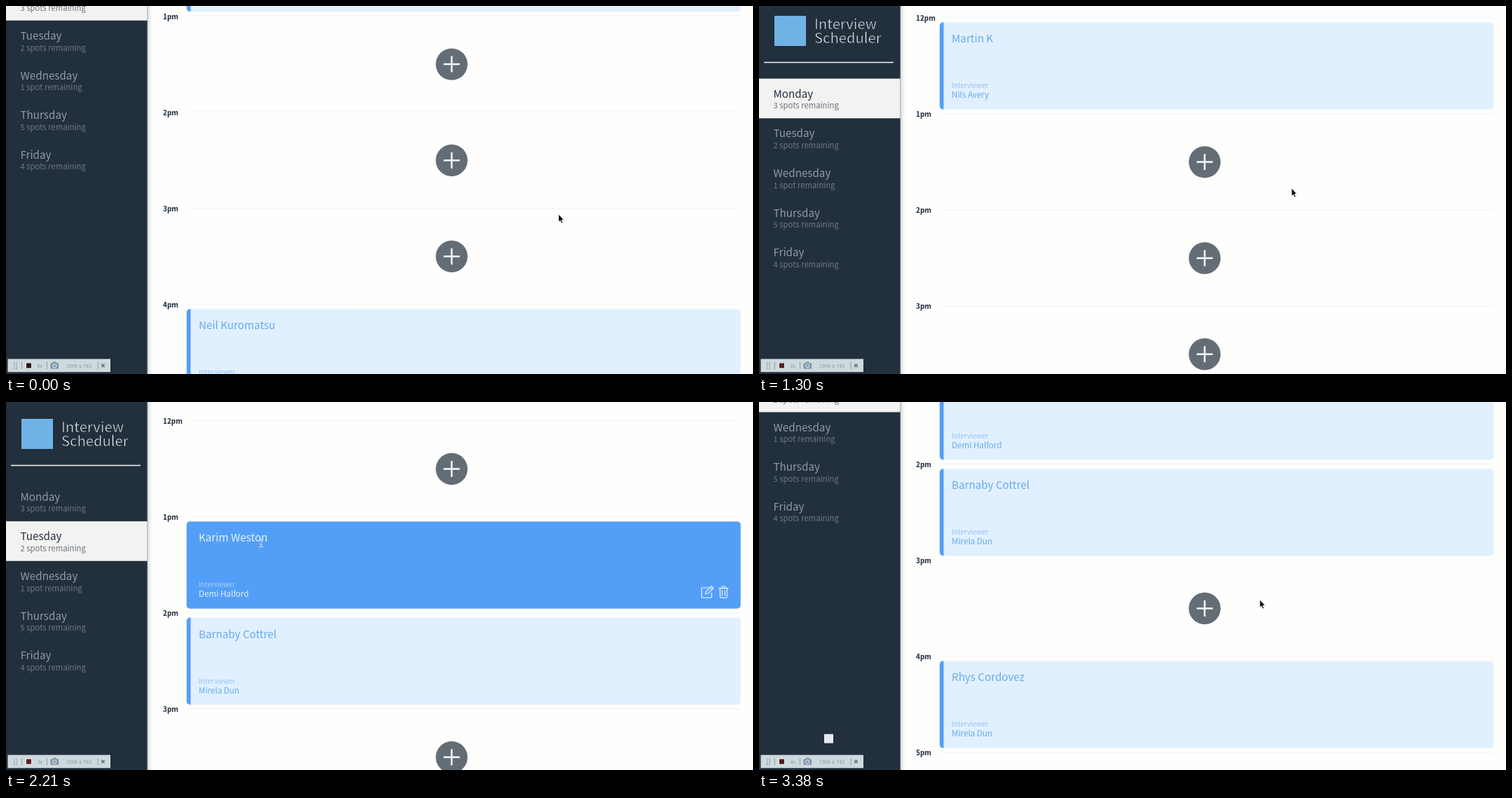
Recreate the animation shown at these times as an HTML page. Size 1066 by 525 pixels, loop 3510 ms.

```html
<!DOCTYPE html>
<html lang="en">
<head>
<meta charset="utf-8">
<title>Interview scheduler</title>
<style>
  html, body { margin: 0; width: 100%; height: 100%; overflow: hidden; background: #fefefd; }
  svg { display: block; width: 100%; height: 100%; }
  text { font-family: "Noto Sans CJK JP", "Noto Sans CJK SC", "Open Sans", sans-serif; }
  /* A background-coloured stroke thins the glyphs to a light weight. */
  .title { font-size: 20.3px; fill: #eef1f3; stroke: #222f3c; stroke-width: .6; }
  .day { font-size: 15.2px; fill: #8f9aa4; }
  .spots { font-size: 11.3px; fill: #6d7984; }
  .active .day { fill: #222f3e; }
  .active .spots { fill: #69737d; }
  .row { fill: none; }
  .active .row { fill: #f2f2f1; }
  .hour { font-size: 10px; font-weight: 700; fill: #1d2938; }
  .rule { stroke: #f2f3f4; stroke-width: 1.2; }
  .card { fill: #e1f0ff; }
  .edge { fill: #549ff6; }
  .name { font-size: 15.2px; fill: #66aaec; }
  .role { font-size: 9.8px; fill: #93c3f2; }
  .host { font-size: 11.6px; font-weight: 500; fill: #66aaec; }
  .icons { fill: none; stroke: #d8e9fc; stroke-width: 1.4; stroke-linejoin: round; stroke-linecap: round; visibility: hidden; }
  .hover .card, .hover .edge { fill: #539ff7; }
  .hover .name, .hover .host { fill: #e4f0fd; }
  .hover .role { fill: #a9cffa; }
  .hover .icons { visibility: visible; }
  .disc { fill: #636d76; }
  .disc.dark { fill: #4b5660; }
  .tool { font-family: "Noto Serif", "Liberation Serif", serif; font-size: 7.2px; fill: #8796a0; }
</style>
</head>
<body>
<svg id="stage" viewBox="0 0 1066 525" preserveAspectRatio="none" xmlns="http://www.w3.org/2000/svg">
  <defs>
    <linearGradient id="shade">
      <stop offset="0" stop-color="#7f8a98" stop-opacity=".55"/>
      <stop offset=".45" stop-color="#a5adb8" stop-opacity=".2"/>
      <stop offset="1" stop-color="#a5adb8" stop-opacity="0"/>
    </linearGradient>
  </defs>
  <rect width="1066" height="525" fill="#fefefd"/>
  <g id="boards"></g>
  <rect x="201" width="8" height="525" fill="url(#shade)"/>
  <rect width="201.6" height="525" fill="#222f3c"/>
  <g id="sidebar">
    <rect x="22" y="24" width="45" height="43" fill="#6fb2e6"/>
    <text class="title" x="79" y="42.6">Interview</text>
    <text class="title" x="79" y="63.2">Scheduler</text>
    <path d="M7 90.4H192" stroke="#f4f6f7" stroke-width="1.5"/>
    <rect x="93" y="686" width="13" height="13" fill="#e6eaec"/>
  </g>
  <g id="toolbar">
    <rect x="2.5" y="503.5" width="146.5" height="18.7" fill="#ced9dd"/>
    <path d="M11.8 508.5V518M15.2 508.5V518" stroke="#75858f" stroke-width="1.3" stroke-dasharray="1.3 1.4"/>
    <path d="M22.5 508V518M58.5 508V518M131.2 508V518" stroke="#8d9ca5" stroke-width="1"/>
    <rect x="28" y="508.5" width="9" height="9" fill="#e6edf0"/>
    <rect id="record" x="29" y="509.5" width="7" height="7"/>
    <text id="clock" class="tool" x="44.5" y="515.6"></text>
    <path d="M63.5 509.5h2.6l1.4-2h3.6l1.4 2h2.6v8H63.5z" fill="#7d96a8"/>
    <circle cx="69.3" cy="513.2" r="2.5" fill="none" stroke="#dce5e9" stroke-width="1.1"/>
    <text class="tool" x="86" y="515.6">1508 x 743</text>
    <path d="M136.2 510.8l4.4 4.4m0-4.4l-4.4 4.4" stroke="#566c7b" stroke-width="1.5"/>
  </g>
  <path id="arrow" d="M0 0V11.2L2.5 9L4.2 13L6 12.2L4.4 8.3H7.6Z" fill="#0b0c0e" stroke="#fff" stroke-width=".7"/>
  <path id="beam" d="M-3.5-6q3 0 3.5 1.2Q.5-6 3.5-6M0-4.8V4.8M-3.5 6q3 0 3.5-1.2Q.5 6 3.5 6M-1.8 2.5H1.8" fill="none" stroke="#c4d3e2" stroke-width="1.2"/>
</svg>
<script>
const LOOP = 3510, STEP = 130;
const HOUR_TOP = 26.5, HOUR_GAP = 137.1, ROW_TOP = 113.6, ROW_GAP = 56.6;
const CARD = { left: 257.8, right: 1048.4, offset: 6.8, height: 124.3 };

const days = [['Monday', 3], ['Tuesday', 2], ['Wednesday', 1], ['Thursday', 5], ['Friday', 4]];
const schedules = [
  { 0: ['Martin K', 'Nils Avery'], 4: ['Neil Kuromatsu', 'Nils Avery'] },
  { 1: ['Karim Weston', 'Demi Halford'], 2: ['Barnaby Cottrel', 'Mirela Dun'], 4: ['Rhys Cordovez', 'Mirela Dun'] }
];

// time, value...
const scrollKeys = [
  [0, 149.5], [130, 172], [260, 190], [390, 200], [520, 202.7], [780, 202.7], [910, 186],
  [1040, 110], [1170, 44], [1300, 10], [1430, 0], [2340, 0], [2470, 14], [2600, 74],
  [2730, 129.3], [2860, 170], [2990, 194], [3120, 206], [3250, 211], [3380, 212.3]
];
const pointerKeys = [
  [0, 788.5, 297], [520, 791.3, 299], [910, 791, 298.5], [1040, 788.3, 294.7], [1170, 786, 292],
  [1300, 760, 260], [1430, 490, 150], [1560, 194, 126.5], [1690, 194, 126.5], [1820, 165, 148],
  [1950, 110, 188], [2080, 130, 198], [2210, 364, 201], [2340, 560, 215], [2470, 665, 228],
  [2600, 706, 235], [2730, 713.3, 234], [2990, 713.5, 242], [3120, 714, 262], [3380, 714.7, 282]
];

const $ = id => document.getElementById(id);

function add(parent, tag, attrs = {}, text) {
  const el = document.createElementNS('http://www.w3.org/2000/svg', tag);
  for (const key in attrs) el.setAttribute(key, attrs[key]);
  if (text !== undefined) el.textContent = text;
  parent.appendChild(el);
  return el;
}

function label(parent, cls, x, y, text) {
  return add(parent, 'text', { class: cls, x, y }, text);
}

function sample(keys, t) {
  const next = keys.findIndex(key => key[0] > t);
  if (next < 0) return keys[keys.length - 1].slice(1);
  const a = keys[next - 1], b = keys[next];
  const k = (t - a[0]) / (b[0] - a[0]);
  return a.slice(1).map((v, i) => v + (b[i + 1] - v) * k);
}

function buildCard(parent, y, [name, host]) {
  const top = y + CARD.offset, { left, right, height } = CARD;
  const g = add(parent, 'g');
  add(g, 'rect', { class: 'card', x: left, y: top, width: right - left, height, rx: 5 });
  add(g, 'path', { class: 'edge', d: `M${left + 5.7} ${top}v${height}h-.7a5 5 0 0 1-5-5v${10 - height}a5 5 0 0 1 5-5z` });
  label(g, 'name', 275, top + 29, name);
  label(g, 'role', 275, top + 94, 'Interviewer');
  label(g, 'host', 275, top + 108, host);
  const icons = add(g, 'g', { class: 'icons', transform: `translate(992 ${top + 91.7})` });
  add(icons, 'path', { d: 'M10 2.8H2.3Q.7 2.8.7 4.4V15.4Q.7 17 2.3 17H13.3Q14.9 17 14.9 15.4V10.5M6.2 11.8l.5-3.2L14.6.7l2.9 2.8-8 7.8zM12.8 2.6l2.8 2.8' });
  add(icons, 'path', { d: 'M25.5 3.6H38.5M29.2 3.4l1-2.4h3.6l1 2.4M27 3.8V15.5Q27 17.2 28.6 17.2H35.4Q37 17.2 37 15.5V3.8M30 7v7M34 7v7' });
  return { top, el: g };
}

function buildButton(parent, y) {
  const cy = y + 69;
  const disc = add(parent, 'circle', { class: 'disc', cx: 636, cy, r: 22.7 });
  add(parent, 'path', { d: `M624.5 ${cy}h23M636 ${cy - 11.5}v23`, stroke: '#fbfcfc', 'stroke-width': 2.5 });
  return disc;
}

const boards = schedules.map(schedule => {
  const board = { el: add($('boards'), 'g'), cards: [], discs: [] };
  for (let h = 0; h < 6; h++) {
    const y = HOUR_TOP + h * HOUR_GAP;
    label(board.el, 'hour', 224, y + 4.4, `${h || 12}pm`);
    add(board.el, 'path', { class: 'rule', d: `M${h ? 258 : 264} ${y}H${CARD.right}` });
    if (h === 5) continue;
    if (schedule[h]) board.cards.push(buildCard(board.el, y, schedule[h]));
    else board.discs.push(buildButton(board.el, y));
  }
  return board;
});

const rows = days.map(([name, spots], i) => {
  const y = ROW_TOP + i * ROW_GAP;
  const g = add($('sidebar'), 'g');
  add(g, 'rect', { class: 'row', y, width: 201.6, height: ROW_GAP });
  label(g, 'day', 20.5, y + 27.2, name);
  label(g, 'spots', 20.5, y + 42.8, `${spots} spot${spots > 1 ? 's' : ''} remaining`);
  return g;
});

function render(time) {
  const t = Math.floor((time % LOOP) / STEP) * STEP;
  const [scroll] = sample(scrollKeys, t);
  const [x, y] = sample(pointerKeys, t);
  const selected = t < 2080 ? 0 : 1;
  const leaving = t >= 1560 && t < 1820;

  const shift = `translate(0 ${-scroll})`;
  $('boards').setAttribute('transform', shift);
  $('sidebar').setAttribute('transform', shift);
  rows.forEach((row, i) => row.setAttribute('class', i === selected ? 'active' : ''));

  let overName = false;
  boards.forEach((board, i) => {
    board.el.style.display = i === selected ? '' : 'none';
    board.cards.forEach((card, n) => {
      const dy = y + scroll - card.top;
      const inside = x > CARD.left && x < CARD.right && dy > 0 && dy < CARD.height;
      if (i === selected && inside && x < 390 && dy < 40) overName = true;
      card.el.setAttribute('class', inside || (leaving && n === 0) ? 'hover' : '');
    });
  });
  boards[0].discs[0].setAttribute('class', leaving ? 'disc dark' : 'disc');

  for (const [id, shown] of [['arrow', !overName], ['beam', overName]]) {
    $(id).style.display = shown ? '' : 'none';
    $(id).setAttribute('transform', `translate(${x} ${y})`);
  }

  $('clock').textContent = `${Math.floor((t - 130) / 910) + 1}s`;
  const glow = 0.5 - 0.5 * Math.cos((t - 20) / 910 * 2 * Math.PI);
  $('record').setAttribute('fill', `rgb(${42 + 54 * glow},${20 + 12 * glow},${25 + 6 * glow})`);
}

const start = performance.now();
function tick() {
  render(performance.now() - start);
  requestAnimationFrame(tick);
}
tick();
</script>
</body>
</html>
```
